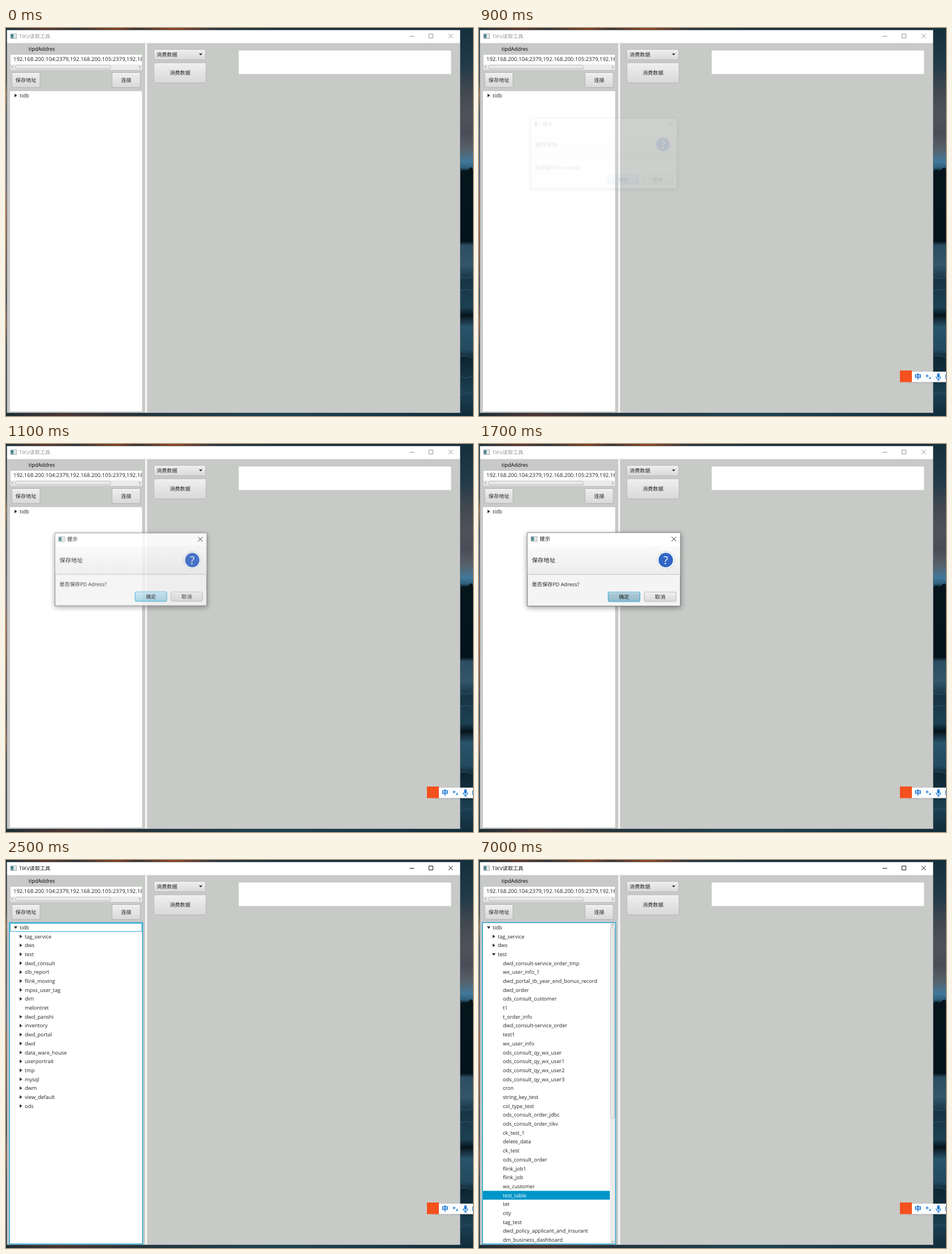
Recreate the animation shown at these times as an HTML page. Size 821 by 682 pixels, loop 8 s.

```html
<!DOCTYPE html>
<html lang="zh-CN">
<head>
<meta charset="utf-8">
<title>TIKV读取工具</title>
<style>
html, body { margin: 0; width: 100%; height: 100%; overflow: hidden; background: #c8cac8; }
svg { display: block; width: 821px; height: 682px; }
text {
  font: 9.1px "Open Sans", "Noto Sans CJK SC", "Noto Sans CJK", "Noto Sans", sans-serif;
  text-rendering: geometricPrecision; white-space: pre; fill: #222;
}
.mid { text-anchor: middle; }
.chrome text { fill: currentColor; }
.chrome path { fill: none; stroke: currentColor; }
.chrome, .ime, .press, .ring, .dialog, .ok, .closed, .open1, .open2, .root1, .root2, .pick {
  animation: 8s step-end infinite;
}
.chrome { animation-name: chrome; }
.ime { animation-name: ime; }
.press { animation-name: press; }
.ring { animation-name: ring; fill: none; stroke: #1ba3d3; stroke-width: 1.5; }
.dialog { animation-name: dialog; transform-origin: 219.5px 220.3px; }
.ok { animation-name: ok; }
.closed { animation-name: closed; }
.open1 { animation-name: open1; }
.open2 { animation-name: open2; }
.root1 { animation-name: open1; }
.root2 { animation-name: root2; }
.pick { animation-name: pick; }
.focus { fill: none; stroke: #2fa9d4; }

@keyframes chrome { 0%, 11.25% { color: #959595 } 8.75%, 22.5%, 100% { color: #111 } }
@keyframes ime { 0% { opacity: 0 } 8.75%, 100% { opacity: 1 } }
@keyframes press {
  0%, 11.25%, 100% { fill: transparent }
  6.25% { fill: rgba(255, 255, 255, .35) }
  8.75% { fill: rgba(0, 0, 0, .07) }
}
@keyframes ring { 0%, 11.25%, 31.25%, 100% { opacity: 0 } 8.75%, 22.5% { opacity: 1 } }
@keyframes dialog {
  0%, 23.75%, 100% { opacity: 0; transform: none }
  11.25% { opacity: .12; transform: scale(.955) }
  12.5% { opacity: .52; transform: scale(.974) }
  13.75% { opacity: .87; transform: scale(.992) }
  15% { opacity: 1; transform: none }
  22.5% { opacity: .4; transform: scale(.979) }
}
@keyframes ok {
  0%, 100% { fill: transparent }
  17.5% { fill: rgba(255, 255, 255, .3) }
  21.25% { fill: rgba(0, 0, 0, .11) }
}
@keyframes closed { 0% { opacity: 1 } 31.25%, 100% { opacity: 0 } }
@keyframes open1 { 0%, 47.5%, 100% { opacity: 0 } 31.25% { opacity: 1 } }
@keyframes open2 { 0% { opacity: 0 } 47.5%, 100% { opacity: 1 } }
@keyframes root2 { 0%, 87.5%, 100% { opacity: 0 } 47.5% { opacity: 1 } }
@keyframes pick { 0% { opacity: 0 } 87.5%, 100% { opacity: 1 } }
</style>
</head>
<body>
<svg id="stage" viewBox="0 0 821 682">
  <defs>
    <linearGradient id="sky" x2="0" y2="1">
      <stop offset="0" stop-color="#14303c"/><stop offset=".1" stop-color="#233b48"/>
      <stop offset=".16" stop-color="#41484f"/><stop offset=".22" stop-color="#4f525b"/>
      <stop offset=".27" stop-color="#4b4c57"/><stop offset=".31" stop-color="#566069"/>
      <stop offset=".345" stop-color="#40789a"/><stop offset=".36" stop-color="#2f6079"/>
      <stop offset=".37" stop-color="#07161e"/><stop offset=".55" stop-color="#04131b"/>
      <stop offset=".56" stop-color="#2c4e61"/><stop offset=".61" stop-color="#32566a"/>
      <stop offset=".65" stop-color="#173444"/><stop offset=".72" stop-color="#1b4153"/>
      <stop offset=".74" stop-color="#07131a"/><stop offset=".77" stop-color="#28536a"/>
      <stop offset=".83" stop-color="#234a5e"/><stop offset=".85" stop-color="#0f2530"/>
      <stop offset=".94" stop-color="#1a4052"/><stop offset="1" stop-color="#112c39"/>
    </linearGradient>
    <linearGradient id="dusk" x2="0" y2="1">
      <stop offset="0" stop-color="#16303a"/><stop offset=".14" stop-color="#3a4245"/>
      <stop offset=".17" stop-color="#c07a3c"/><stop offset=".22" stop-color="#355064"/>
      <stop offset=".4" stop-color="#77709a"/><stop offset=".47" stop-color="#d0642e"/>
      <stop offset=".6" stop-color="#8a4a3c"/><stop offset=".7" stop-color="#33424c"/>
      <stop offset=".76" stop-color="#c2603c"/><stop offset=".82" stop-color="#243a45"/>
      <stop offset="1" stop-color="#152e38"/>
    </linearGradient>
    <linearGradient id="glow">
      <stop offset="0" stop-color="#16303a"/><stop offset=".09" stop-color="#5e3426"/>
      <stop offset=".15" stop-color="#2b3236"/><stop offset=".24" stop-color="#8a3f1e"/>
      <stop offset=".29" stop-color="#38312f"/><stop offset=".37" stop-color="#9a4420"/>
      <stop offset=".46" stop-color="#2a3439"/><stop offset=".6" stop-color="#172f39"/>
      <stop offset="1" stop-color="#14303c"/>
    </linearGradient>
    <linearGradient id="floor">
      <stop offset="0" stop-color="#1b2c34"/><stop offset=".12" stop-color="#4a3432"/>
      <stop offset=".3" stop-color="#22323a"/><stop offset=".6" stop-color="#1b4152"/>
      <stop offset="1" stop-color="#122d3a"/>
    </linearGradient>
    <linearGradient id="face" x2="0" y2="1">
      <stop offset="0" stop-color="#efefef"/><stop offset="1" stop-color="#d9d9d9"/>
    </linearGradient>
    <linearGradient id="blue" x2="0" y2="1">
      <stop offset="0" stop-color="#c8e5f2"/><stop offset="1" stop-color="#a3d0e5"/>
    </linearGradient>
    <linearGradient id="head" x2="0" y2="1">
      <stop offset="0" stop-color="#fbfbfb"/><stop offset="1" stop-color="#ececec"/>
    </linearGradient>
    <linearGradient id="thumb" x2="0" y2="1">
      <stop offset="0" stop-color="#f2f2f2"/><stop offset="1" stop-color="#dcdcdc"/>
    </linearGradient>
    <linearGradient id="bar">
      <stop offset="0" stop-color="#f2f2f2"/><stop offset="1" stop-color="#dcdcdc"/>
    </linearGradient>
    <linearGradient id="pane" x2="1" y2="1">
      <stop offset="0" stop-color="#2e5f86"/><stop offset="1" stop-color="#5fae8c"/>
    </linearGradient>
    <filter id="soft" x="-20%" y="-30%" width="140%" height="160%"><feGaussianBlur stdDeviation="5"/></filter>
    <filter id="hint" x="-20%" y="-50%" width="140%" height="200%"><feGaussianBlur stdDeviation="1"/></filter>
    <clipPath id="field"><path d="M8 47h231v17H8z"/></clipPath>
    <clipPath id="list"><path d="M7 111h232v563H7z"/></clipPath>
    <g id="icon">
      <path d="M.5.5h10.5v8.5H.5z" fill="#f3f6f7" stroke="#8d979c" stroke-width=".8"/>
      <path d="M1.2 1.6h4.6v6.7H1.2z" fill="url(#pane)"/>
      <path d="M7 3h3M7 5h3M7 7h3" stroke="#b9c6cc" stroke-width=".8"/>
    </g>
  </defs>

  <!-- desktop -->
  <path d="M0 0h821v682H0z" fill="#14303c"/>
  <path d="M0 0h799v5H0z" fill="url(#glow)"/>
  <path d="M0 675h799v7H0z" fill="url(#floor)"/>
  <path d="M0 0h3v682H0z" fill="url(#dusk)"/>
  <path d="M798 0h23v682h-23z" fill="url(#sky)"/>
  <path d="M799 256q3-9 7-6t9-3 6 5v24q-8 6-10 22l-12 12z" fill="#06141b"/>
  <path d="M799 418q11-6 22 2M799 438q12 5 22-2M799 462q10-5 22 1M799 578q12-5 22 3M799 612q10 6 22-1M799 645q12-6 22-2"
    fill="none" stroke="#386173" stroke-width="1.3" opacity=".55"/>

  <!-- window -->
  <path d="M1.5 3.5h797v673H1.5z" fill="#c8cac8" stroke="#68737a"/>
  <path d="M2 4h796v22.5H2z" fill="#fff"/>
  <use href="#icon" x="7.5" y="9.5"/>
  <g class="chrome">
    <text x="23" y="17.8">TIKV读取工具</text>
    <path d="M709.5 14.5h8M743.5 10.5h7v7h-7zM778 10.5l7.5 7.5M785.5 10.5l-7.5 7.5"/>
  </g>
  <path d="M244.7 27h3.3v649h-3.3z" fill="#f6f6f6"/>

  <text x="39.7" y="40.3" style="fill:#000">tipdAddres</text>
  <path d="M8 47h231v17H8z" fill="#fff"/>
  <g clip-path="url(#field)">
    <text x="13" y="58.4" style="font-size:9.5px">192.168.200.104:2379,192.168.200.105:2379,192.168.200.106:2379</text>
  </g>
  <path d="M8 64h231v9.5H8z" fill="#ebebeb"/>
  <rect x="16.5" y="65.3" width="167.5" height="6.8" rx="2.5" fill="url(#thumb)" stroke="#b4b4b4" stroke-width=".8"/>
  <path d="M12.7 66l-2.4 2.6 2.4 2.6M234 66l2.4 2.6-2.4 2.6" fill="none" stroke="#777" stroke-width=".9"/>

  <path d="M409 39.5h373.5v41.5H409z" fill="#fff" stroke="#d6d8d6" stroke-width=".6"/>
  <g id="buttons"></g>
  <rect class="press" x="11" y="79.2" width="48" height="24.6" rx="2"/>
  <rect class="ring" x="9.7" y="77.9" width="50.8" height="26.4" rx="2.2"/>
  <path d="M339.2 44.8h6l-3 3.4z" fill="#333"/>

  <!-- tree -->
  <path d="M6.5 110.5h233.3v564H6.5z" fill="#fff" stroke="#bfc1bf" stroke-width=".7"/>
  <g id="tree" clip-path="url(#list)"></g>
  <g class="open2">
    <path d="M230.3 111h9v563.5h-9z" fill="#ebebeb"/>
    <rect x="231.5" y="118.7" width="7" height="335.3" rx="2.5" fill="url(#bar)" stroke="#b4b4b4" stroke-width=".8"/>
    <path d="M232.6 115.3l2.6-2.4 2.6 2.4M232.6 669.8l2.6 2.4 2.6-2.4" fill="none" stroke="#777" stroke-width=".9"/>
  </g>
  <path class="focus root1" d="M7.7 111.4h231v14.2H7.7z"/>
  <path class="focus root2" d="M7.7 111.4h221.2v14.2H7.7z"/>
  <g class="pick">
    <path d="M7 581.4h223v15.7H7z" fill="#0096c9"/>
    <text x="42" y="592.5" style="fill:#fff">test_table</text>
  </g>
  <g style="animation:closed 8s step-end infinite reverse none"></g>
  <path class="focus pick-ring" id="edge" d="M6 110h234.3v565H6z" stroke-width="1.6"/>

  <!-- input bar -->
  <g class="ime">
    <path d="M752 605h75v18h-75z" opacity=".3" filter="url(#hint)"/>
    <path d="M752 604h69v18.5h-69z" fill="#fbfcfd"/>
    <path d="M740 602h21v20.5h-21z" fill="#f4521c"/>
    <text x="765.8" y="617.4" style="font-size:12px;font-weight:700;fill:#0b70d3">中</text>
    <g fill="none" stroke="#0b70d3">
      <circle cx="787.8" cy="611.6" r="1.5" stroke-width="1.2"/>
      <path d="M793.3 613.4v1.6l-1.2 2" stroke-width="1.8"/>
      <path d="M803.7 612.5q0 4 4 4t4-4M807.7 616.5v2.5M805.3 619h4.8" stroke-width="1.2"/>
    </g>
    <rect x="805.6" y="607" width="4.2" height="7.6" rx="2.1" fill="#0b70d3"/>
    <path d="M820 609h1v8h-1z" fill="#0b70d3"/>
  </g>

  <!-- dialog -->
  <g class="dialog">
    <path d="M84 158h271v130H84z" opacity=".38" filter="url(#soft)"/>
    <path d="M85 155.9h269v129H85z" fill="#f4f4f4" stroke="#6f7173"/>
    <path d="M85.5 156.4h268v22.6h-268z" fill="#fff"/>
    <path d="M85.5 179h268v50h-268z" fill="url(#head)"/>
    <path d="M85.5 229.2h268" stroke="#c2c2c2"/>
    <use href="#icon" x="91" y="162"/>
    <text x="106.8" y="170.3" style="fill:#000">提示</text>
    <path d="M338.6 163l8 8M346.6 163l-8 8" stroke="#222"/>
    <text x="93" y="208.4" style="font-size:10.3px">保存地址</text>
    <circle cx="328.3" cy="204.2" r="15.2" fill="#fff" stroke="#cbced4"/>
    <circle cx="328.3" cy="204" r="12.7" fill="#3265c6"/>
    <text class="mid" x="328.3" y="211" style="font-size:19px;fill:#fff">?</text>
    <text x="93" y="250">是否保存PD Adress?</text>
    <g id="answers"></g>
    <rect class="ok" x="227.6" y="260.8" width="55" height="15.6" rx="1.5"/>
    <text class="mid" x="255" y="272">确定</text>
  </g>
</svg>
<script>
const $ = id => document.getElementById(id);
const ROW = 15.69, TOP = 118.6;

const button = (x, y, w, h, label, tx = x + w / 2, fill = 'url(#face)', line = '#b0b2b0') =>
  `<rect x="${x}" y="${y}" width="${w}" height="${h}" rx="2" fill="${fill}" stroke="${line}" stroke-width=".9"/>` +
  `<path d="M${x + 1.5} ${y + 1}h${w - 3}" stroke="#fff" stroke-width=".9" opacity=".7"/>` +
  `<text class="mid" x="${tx}" y="${y + h / 2 + 3.4}">${label}</text>`;

$('buttons').innerHTML =
  button(10.3, 78.5, 49.5, 26, '保存地址') +
  button(186.5, 78.5, 49.5, 26, '连接') +
  button(260, 38, 91, 18, '消费数据', 282.8) +
  button(260, 61.4, 91.7, 35, '消费数据');

$('answers').innerHTML =
  button(227, 260.2, 56, 16.8, '', 255, 'url(#blue)', '#129fd0') +
  button(290.4, 260.4, 56, 16.4, '取消');

// mark: '>' collapsed, 'v' expanded, '' leaf
function row(i, level, mark, name) {
  const y = TOP + i * ROW, x = 17 + level * 9;
  const shape = { '>': 'M-2-3.1L2.6 0L-2 3.1z', v: 'M-3.1-2H3.1L0 2.6z' }[mark];
  return (shape ? `<path d="${shape}" fill="#333" transform="translate(${x} ${y})"/>` : '') +
    `<text x="${x + 7}" y="${y + 3.3}">${name}</text>`;
}

const schemas = `tag_service dws test dwd_consult slb_report flink_moving mpss_user_tag dim melontret
  dwd_panshi inventory dwd_portal dwd data_ware_house userportrait tmp mysql dwm view_default ods`.split(/\s+/);
const tables = `dwd_consult-service_order_tmp wx_user_info_1 dwd_portal_tb_year_end_bonus_record dwd_order
  ods_consult_customer t1 t_order_info dwd_consult-service_order test1 wx_user_info ods_consult_qy_wx_user
  ods_consult_qy_wx_user1 ods_consult_qy_wx_user2 ods_consult_qy_wx_user3 cron string_key_test col_type_test
  ods_consult_order_jdbc ods_consult_order_tikv ck_test_1 delete_data ck_test ods_consult_order flink_job1
  flink_job wx_customer test_table tet city tag_test dwd_policy_applicant_and_insurant
  dm_business_dashboard`.split(/\s+/);

const root = row(0, 0, 'v', 'tidb');
const list = schemas.map((s, i) => row(i + 1, 1, s === 'melontret' ? '' : '>', s));
$('tree').innerHTML =
  `<g class="closed">${row(0, 0, '>', 'tidb')}</g>` +
  `<g class="open1">${root}${list.join('')}</g>` +
  `<g class="open2">${root}${list[0]}${list[1]}${row(3, 1, 'v', 'test')}` +
  tables.map((t, i) => row(i + 4, 2, '', t)).join('') + '</g>';

// the list keeps keyboard focus once it has been opened
$('edge').animate([{ opacity: 0, offset: 0, easing: 'step-end' }, { opacity: 1, offset: .3125 }, { opacity: 1, offset: 1 }],
  { duration: 8000, iterations: Infinity });
</script>
</body>
</html>
```
